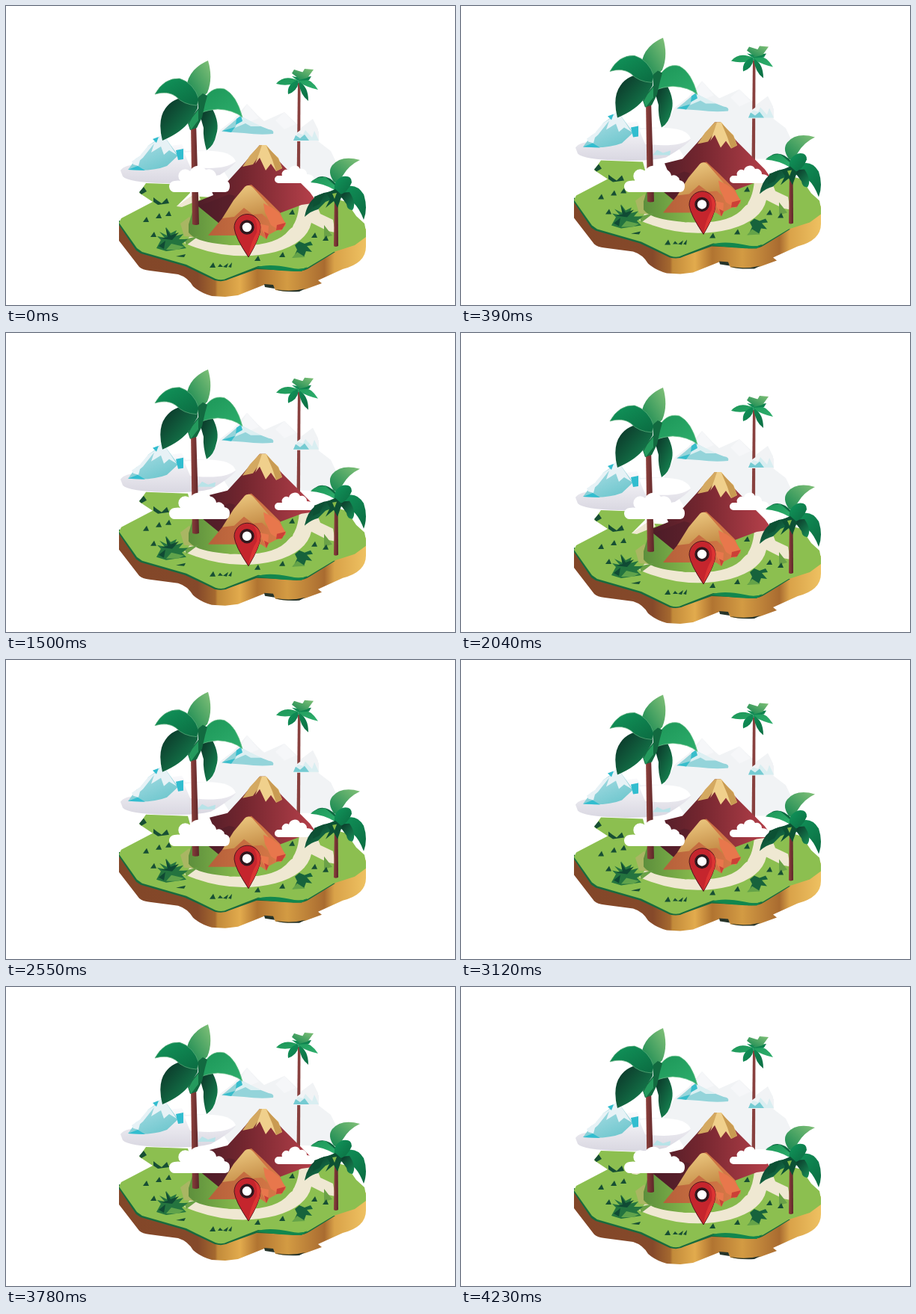
Recreate the animation shown at these times as an HTML page. Size 600x400 px, loop 4.53 s.

```html
<!DOCTYPE html>
<html lang="en">
<head>
<meta charset="utf-8">
<title>Floating island</title>
<style>
html, body { margin: 0; width: 100%; height: 100%; overflow: hidden; background: #fff; }
svg { display: block; width: 100vw; height: 100vh; }
</style>
</head>
<body>
<svg viewBox="0 0 600 400">
<defs>
  <linearGradient id="soil" gradientUnits="userSpaceOnUse" x1="150" x2="482">
    <stop stop-color="#824628"/><stop offset=".32" stop-color="#85492a"/>
    <stop offset=".39" stop-color="#a5692f"/><stop offset=".4" stop-color="#c28a3a"/>
    <stop offset=".49" stop-color="#e2ab4d"/><stop offset=".56" stop-color="#b17431"/>
    <stop offset=".68" stop-color="#d39b43"/><stop offset=".83" stop-color="#a96b30"/>
    <stop offset=".87" stop-color="#d9a249"/><stop offset="1" stop-color="#efc262"/>
  </linearGradient>
  <linearGradient id="rock"><stop stop-color="#4d1d28"/><stop offset=".4" stop-color="#74262f"/><stop offset="1" stop-color="#b8414b"/></linearGradient>
  <linearGradient id="tan" x2=".4" y2="1"><stop stop-color="#f0cf86"/><stop offset="1" stop-color="#c28742"/></linearGradient>
  <linearGradient id="clay" x2="1"><stop stop-color="#b5603a"/><stop offset="1" stop-color="#d97b48"/></linearGradient>
  <linearGradient id="ice" x2=".6" y2="1"><stop stop-color="#b9e3ea"/><stop offset="1" stop-color="#72c8cf"/></linearGradient>
  <linearGradient id="mist" x2="0" y2="1"><stop stop-color="#fafafc"/><stop offset="1" stop-color="#d9d7e1"/></linearGradient>
  <linearGradient id="bright" x1="1" x2="0" y2="1"><stop stop-color="#82c178"/><stop offset="1" stop-color="#128650"/></linearGradient>
  <linearGradient id="mid" x2="1" y2="1"><stop stop-color="#11965b"/><stop offset="1" stop-color="#0b6b41"/></linearGradient>
  <linearGradient id="mint" x2="1" y2="1"><stop stop-color="#1c9658"/><stop offset="1" stop-color="#2eae6c"/></linearGradient>
  <linearGradient id="dark" x2="1" y2="1"><stop stop-color="#0a2d24"/><stop offset="1" stop-color="#179057"/></linearGradient>
  <linearGradient id="lawn"><stop stop-color="#5d8f3c"/><stop offset=".45" stop-color="#86b94c"/></linearGradient>
  <linearGradient id="bark"><stop stop-color="#8f423d"/><stop offset="1" stop-color="#5c2529"/></linearGradient>
</defs>

<g class="float">
  <!-- distant peaks -->
  <path fill="#f1f3f5" d="M268 199 286 166 304 152 322 131 336 146 345 154 372 142 394 163 410 151 417 165 417 181 434 194 444 215 435 235H300L283 209Z"/>
  <path fill="#f6f7f9" d="M322 131 338 150 325 155 313 148ZM372 142 387 158 372 165 360 153Z"/>
  <path fill="url(#mist)" d="M153 220Q158 212 178 212L219 187 235 185 240 194Q300 190 307 209Q300 218 274 233Q250 239 210 237 164 236 156 228Z"/>
  <path fill="#fff" d="M238 196Q300 188 307 208 290 221 246 215Z"/>
  <path fill="url(#ice)" d="M163 219 174 204 185 198 190 187 200 180 209 171 217 182 230 200 215 214Q195 222 163 219Z"/>
  <path fill="#e7f2f6" d="M209 171 218 184 228 199 218 193 211 199 207 188 194 196 198 184 183 203 176 209 180 199 190 187 200 181ZM168 208 181 199 177 214 170 212Z"/>
  <path fill="#32bdcf" d="M196 178 204 175 201 183ZM227 193 237 191V205L230 206ZM163 219 176 214 186 220Z"/>
  <path fill="#b8e3e8" d="M256 230 262 223 270 227 280 224 279 230Z"/>
  <path fill="#94d4da" d="M288 168 299 159 313 147 333 158 351 165Q359 166 357 171 340 173 318 170Z"/>
  <path fill="#dceff2" d="M313 147 341 161 327 161 320 157 306 163Z"/>
  <path fill="#38bdcb" d="M308 151 314 147 316 154 307 159ZM289 167 306 162 301 169Z"/>

  <!-- back palm -->
  <path fill="#88403e" d="M390 103H393.500L393 240H388.500Z"/>
  <path fill="#f1f3f5" d="M380 181V174L388 170 395 165 400 162 406 167 413 163 418 168V181Z"/>
  <path fill="#d9eef1" d="M384 180 390 170 397 172 400 166 409 176 412 167 418 180Z"/>
  <path fill="#75cbd2" d="M384 180 387 173 393 177 399 172 405 180Z"/>
  <path fill="url(#mint)" d="M391 100Q372 91 361 104 374 108 389 103ZM391 99Q405 93 417 112 403 109 391 102Z"/>
  <path fill="url(#mid)" d="M390 99Q375 104 377 118 389 114 391 102ZM391 101Q404 107 404 127 393 119 391 101ZM382 94 388 95 401 95 408 94 405 99 390 100Z"/>
  <path fill="url(#bright)" d="M391 98 399 84 411 85 403 96 392 99ZM391 97 382 90 385 85 398 89Z"/>

  <!-- ground -->
  <path fill="url(#soil)" d="M151 289V314L178 349Q182 353 192 354L230 359Q243 363 250 375 260 384 275 388L293 389 310 387 345 373 358 376 360 380Q378 384 400 379L422 371 417 367 450 352Q481 344 481 322V298Z"/>
  <path fill="#26342a" d="M345 372 357 373 359 378 346 376ZM360 379Q380 383 400 378L392 382Q370 383 360 379Z"/>
  <path fill="#176b3e" d="M151 287V293L174 327 180 331 239 348 279 367Q290 370 299 365L335 352 379 354Q396 357 406 350L440 329 400 320H250Z"/>
  <path fill="#8cbf50" d="M187 237 243 239 246 250 228 268 258 255 400 263 440 258 455 262 468 281 479 291 481 301V309L466 320 438 329 403 350Q393 353 379 352L337 348 296 364Q289 368 280 365L241 346 182 329 175 324 151 290 154 284 196 262 178 250Z"/>
  <path fill="#11874e" d="M334 350Q350 344 379 350 394 354 403 349L395 355Q365 355 334 350Z"/>
  <path fill="#efe8d2" d="M228 268 256 248 260 259 235 269ZM390 264 413 260 420 278 437 286 440 303 430 301 408 290Q402 317 360 329 300 344 238 317L246 308 300 320 350 313 383 296Z"/>
  <path fill="#a9b663" d="M233 291 245 282 260 310 238 308Z"/>
  <path fill="url(#lawn)" d="M244 292 252 266 300 270 373 264 392 264Q390 290 378 300 361 322 308 320 255 318 244 303Z"/>
  <path fill="#6ba247" d="M425 293 436 307 425 310ZM238 312 257 308 241 320Z"/>

  <!-- mountains -->
  <path fill="url(#rock)" d="M339 186H347L369 212 406 249 416 263 395 266 358 280 290 295 257 268 255 262 277 253 272 241 296 235 316 213Z"/>
  <path fill="#4d1d28" opacity=".5" d="M257 268 298 252 306 254 290 295Z"/>
  <path fill="#d4a961" d="M339 186H347L344 197 337 202 330 212 316 215 326 200Z"/>
  <path fill="#f0d08c" d="M342 186H348L355 195 364 203 369 217 361 221 354 211 347 220 339 203 333 211 338 198Z"/>
  <path fill="#c99b52" d="M348 187 364 204 369 217 361 221 356 206Z"/>
  <path fill="url(#clay)" d="M320 241 328 239 343 253 366 276 374 294 351 306 348 312 341 307 270 307 289 284 300 272Z"/>
  <path fill="url(#tan)" d="M319 242Q325 237 331 244L350 266 365 286 356 291 342 278 330 279 318 270 305 282 289 284 304 260Z"/>
  <path fill="#e8774c" d="M344 264 356 270 365 277 374 291 367 301 354 293 346 276ZM337 291 351 294 350 309 345 305Z"/>
  <path fill="#cc4037" d="M362 293 374 290 369 299 361 300ZM345 302 351 305 348 312Z"/>

  <!-- plants on the ground -->
  <g fill="#174f34" class="tufts">
    <path d="M178 249 184 242 188 248 181 252ZM197 256 202 260 208 264 215 257 218 264 203 266 197 262ZM227 335 240 332 238 336ZM283 349 286 345 290 349ZM290 349 297 344 295 350ZM297 349 302 343 301 350Z"/>
  </g>
  <path fill="#24743f" d="M201 324 207 313 202 308 212 310 205 302 215 307 214 296 220 304 228 300 225 308 237 305 231 312 243 312 235 318 241 324 214 328Z"/>
  <path fill="#104a34" d="M213 296 220 307 231 303 222 313 207 311 216 309ZM204 321 213 314 211 325Z"/>
  <path fill="#60a34b" d="M214 326 221 318 238 322 230 326Z"/>
  <path fill="#17633c" d="M386 320 392 315 399 318 407 315 410 320 402 321 409 329 401 328 398 336 391 332 384 337 389 326Z"/>
  <path fill="#64a348" d="M382 337 389 329 400 336Z"/>

  <!-- large palm -->
  <path fill="url(#bark)" d="M247 157H254L256 220 258 292Q253 294 249 292Z"/>
  <path fill="url(#bright)" d="M257 123Q240 114 242 103 247 83 270 73 277 97 269 116L261 124Z"/>
  <path fill="url(#dark)" d="M257 124Q227 117 213 137 202 152 209 180 235 169 246 153L256 137Z"/>
  <path fill="url(#dark)" d="M258 142 276 138Q286 157 281 172 278 187 268 193 263 176 264 163Z"/>
  <path fill="url(#mid)" stroke="#62b17e" stroke-width=".7" d="M258 125Q251 103 232 97 211 96 199 118 216 113 227 121 237 132 255 133Z"/>
  <path fill="url(#mint)" stroke="#73c58f" stroke-width=".7" d="M261 132Q272 106 292 111 308 119 316 149 304 139 283 138 269 139 261 143Z"/>
  <path fill="#126a40" d="M257 122 263 117 269 120 266 131 262 149 255 163 246 166 243 157 249 147 257 137Z"/>
  <path fill="#249a5d" d="M249 149 257 139 257 153 247 166 244 158Z"/>
</g>

<!-- still clouds -->
<g fill="#fff">
  <path d="M226 249A7 7 0 0 1 225 234Q231 233 233 234A9 9 0 0 1 246 221 12 12 0 0 1 267 219 10 10 0 0 1 281 227 8 8 0 0 1 292 233Q299 234 299 241T293 249Z"/>
  <path d="M364 237A5 5 0 0 1 364 227L369 227A6 6 0 0 1 378 220 8 8 0 0 1 393 218 7 7 0 0 1 402 225Q411 225 412 232 412 237 406 237Z"/>
</g>

<g class="float">
  <!-- right palm -->
  <path fill="url(#bark)" d="M439 252H443.500L444 321Q440 323 438 321Z"/>
  <path fill="url(#bright)" d="M438 235Q429 222 436 213 448 199 473 206 458 213 450 227L443 238Z"/>
  <path fill="#0d6840" d="M440 244 420 230 407 235 417 229Q430 225 442 239Z"/>
  <path fill="url(#mint)" d="M439 246Q424 237 407 236 415 228 427 229L441 241Z"/>
  <path fill="url(#dark)" d="M440 248Q405 248 399 282 408 274 417 272L427 262 440 257Z"/>
  <path fill="url(#mid)" d="M442 249Q465 231 478 252 484 270 478 286 472 270 464 263 454 256 443 256Z"/>
  <path fill="url(#dark)" d="M444 250 459 249Q469 264 463 273 456 273 455 265Z"/>
  <path fill="url(#mid)" d="M439 248Q437 233 450 228 462 226 462 236 457 250 443 254Z"/>
  <path fill="#0c5134" d="M428 250 440 245 449 253 443 270 438 261 427 270 433 258ZM412 255 426 250 419 265 410 269Z"/>
  <path fill="#85b848" d="M436 251 442 250 439 258Z"/>

  <!-- map pin -->
  <path fill="#c5252d" stroke="#4d171e" stroke-width="1" d="M324 336Q306 309 305 297A17.500 18 0 0 1 340 296Q340 309 324 336Z"/>
  <path fill="#dc3433" d="M324 335Q327 316 335 303 337 291 331 282 340 287 340 296 340 309 324 335Z"/>
  <circle cx="322" cy="296" r="8" fill="#fff" stroke="#30171d" stroke-width="3.500"/>
</g>
</svg>
<script>
const LOOP = 4530, STEP = 30;
// time in ms, height in px
const keys = [
  [0, 0], [420, -31], [700, -18], [1190, -31], [1250, -31], [2060, 0], [2160, 0],
  [2590, -31], [2890, -18], [3210, -28.5], [3490, 0], [3930, -31], [4230, -18], [LOOP, -18]
];
const tufts = [[187, 286], [204, 281], [217, 278], [197, 306], [276, 347], [336, 338], [369, 333], [382, 276], [412, 307], [427, 311]];
const tuftGroup = document.querySelector(".tufts");
tuftGroup.innerHTML += tufts.map(([x, y]) => `<path d="M${x - 4} ${y + 3}l5-7 3 7z"/>`).join("");

function heightAt(t) {
  const i = keys.findIndex(k => k[0] > t);
  const [t0, y0] = keys[i - 1], [t1, y1] = keys[i];
  return y0 + (y1 - y0) * (1 - Math.cos(Math.PI * (t - t0) / (t1 - t0))) / 2;
}

const floating = document.querySelectorAll(".float");
const start = performance.now();
function draw() {
  const t = (performance.now() - start) % LOOP;
  const y = heightAt(Math.floor(t / STEP) * STEP);
  for (const part of floating) part.setAttribute("transform", `translate(0 ${y.toFixed(2)})`);
  requestAnimationFrame(draw);
}
draw();
</script>
</body>
</html>
```
